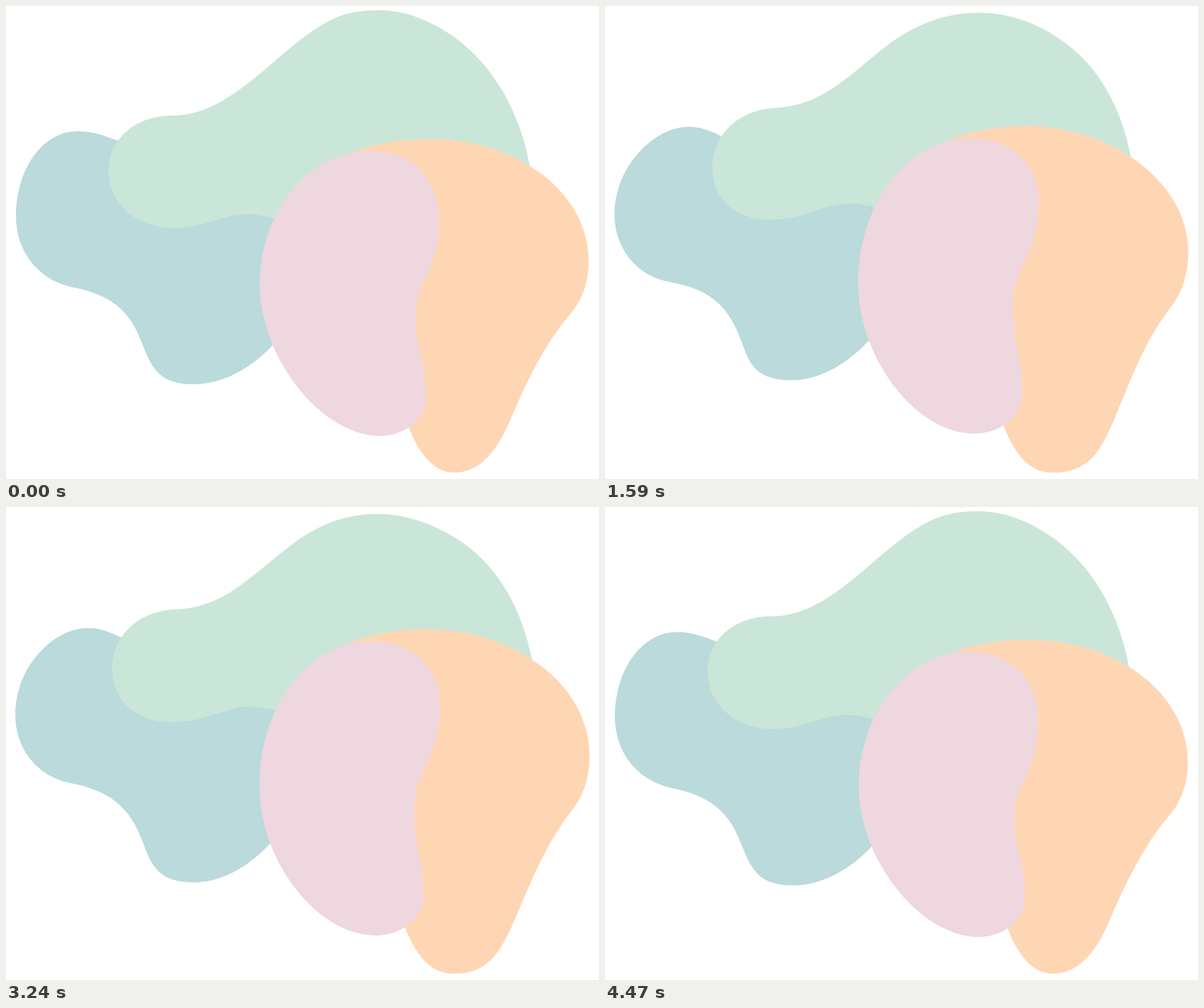
Write an HTML page that moves like this. It is 837x669 px and loops after 4.5 s.

```html
<!DOCTYPE html>
<html lang="en">
<head>
<meta charset="utf-8">
<title>Morphing blobs</title>
<style>
html, body { margin: 0; width: 100%; height: 100%; overflow: hidden; background: #fff; }
svg { display: block; width: 837px; height: 669px; }
</style>
</head>
<body>
<svg viewBox="0 0 837 669"></svg>
<script>
const LOOP = 4500, SWELL = 420;
const svg = document.querySelector('svg');
const blobs = [];

// A node is x, y, outgoing handle x, y, and the ratio of incoming to outgoing handle.
// "rest" and "full" are its offsets at the start and the middle of the loop.
const node = (base, rest, full) => ({ base, rest, full });

function blob(fill, ...nodes) {
  const path = document.createElementNS(svg.namespaceURI, 'path');
  path.setAttribute('fill', fill);
  svg.append(path);
  blobs.push({ path, nodes });
}

blob('#badadc',
  node([106, 172.5, -44, 0, 1.08], [-4, 4.5, -10], [14, -2, -6]),
  node([12, 289, 0, 56, 1.29], [2, 7, 0, 0, -.22], [1.5, 6, 0, -9, .1]),
  node([88, 391, 37, 10, 1.08], [7, 7, 13, 0, -.18], [3, -1, 10, -2, -.08]),
  node([187, 454, 19, 32, 1.07], [3, 18, -3, 9], [-3, 1, -1, 7]),
  node([274, 538, 41, 0, 1.6], [-9, -3, 4, 0, -.5], [-12, -10, 4, 0, -.2]),
  node([376, 486, 70, -78, .36], [1, -7], [-3, -16]),
  node([300, 220, -90, 14, 1.8], [], []));

blob('#cae6d9',
  node([235, 148, 90, 0, .63], [0, 7, 10, 0, -.08], [7, -4.5, -30, -4, .29]),
  node([455, 19, 40, -16, 1.75], [35, -10, -14, 11, 1.6], [-70, 46, 42, -52, -1.2]),
  node([590, 19, 80, 28, .55], [-15, -5, 15, 5, -.27], [75, 43, -36, 12, 1.38]),
  node([750, 260, 26, 163, .77], [-6, 0, -12, -8], [-4, -20, -10, 0, -.3]),
  node([345, 294.5, -34, 0, 1.47], [-3, -.5], [2, -17.5, -6, 0, -.2]),
  node([238, 313.5, -60, 0, .73], [-1, .5, 3], [-4, -13, 8, 0, .2]),
  node([143, 231, 0, -43, 1], [2, 2], [10, -3]));

blob('#ffd6b4',
  node([585, 185, 150, 0, .25], [15, 3, -35, 0, .1], [9, -17.5, -29, 0, .06]),
  node([825.5, 368, 0, 29, 3.55], [-3, -6], [-2.5, -23, 0, 3, -.55]),
  node([807, 433, -43, 50, .26], [-10, 2, 6, -7, .14], [-9, -9, 3, 3, .12]),
  node([716, 578, -25, 52, .88], [-4, 7, 7, -9, .3], [3, 8, 4, -1, .1]),
  node([630, 660, -33, 0, 1.27], [3, 0, 2, 0, -.1], [2, 0, -5]),
  node([565, 599, -35, -89, .37], [4, -2], [-3, -7]),
  node([478, 205, 32, -13, .1], [12, 1, 3], [9, -18]));

blob('#eed7df',
  node([512, 202, 63, 0, 1.38], [0, 3, 5, 0, -.14], [5, -17, -5, 0, .15]),
  node([614, 295, 0, 35, 1.57], [-3, 8, 0, -2], [-2, -20, 0, -2]),
  node([594, 380, -11, 22, 1], [-1, 3, 1, -3], [-2, -22]),
  node([577, 443, 0, 40, .57], [1, -3], [-1.5, -21, 0, 8, -.07]),
  node([590, 555, 0, 33, 1.12], [3, -5, 0, 2], [-1, -10, 0, 4]),
  node([523, 610.5, -83, 0, .42], [5, -2.5], [-2, -6.5]),
  node([359, 406, 0, -114, .92], [-1, -13, 0, 13, .11], [-2, -16]));

function outline(nodes, pose, amount) {
  const pts = nodes.map(n => n.base.map((v, i) => v + (n[pose][i] || 0) * amount));
  const [x, y] = pts[0];
  const curves = pts.map(([px, py, hx, hy], i) => {
    const [qx, qy, gx, gy, k] = pts[(i + 1) % pts.length];
    return 'C' + [px + hx, py + hy, qx - gx * k, qy - gy * k, qx, qy].map(v => v.toFixed(2));
  });
  return `M${x},${y}${curves.join('')}Z`;
}

function draw(now) {
  const t = now % LOOP, s = Math.min(t, LOOP - t);
  const early = s < SWELL;
  const left = early ? 1 - s / SWELL : 1 - (s - SWELL) / (LOOP / 2 - SWELL);
  const amount = early ? left : 1 - left * left;
  for (const { path, nodes } of blobs)
    path.setAttribute('d', outline(nodes, early ? 'rest' : 'full', amount));
}

const start = performance.now();
function tick(now) {
  draw(Math.max(0, now - start));
  requestAnimationFrame(tick);
}
draw(0);
requestAnimationFrame(tick);
</script>
</body>
</html>
```
